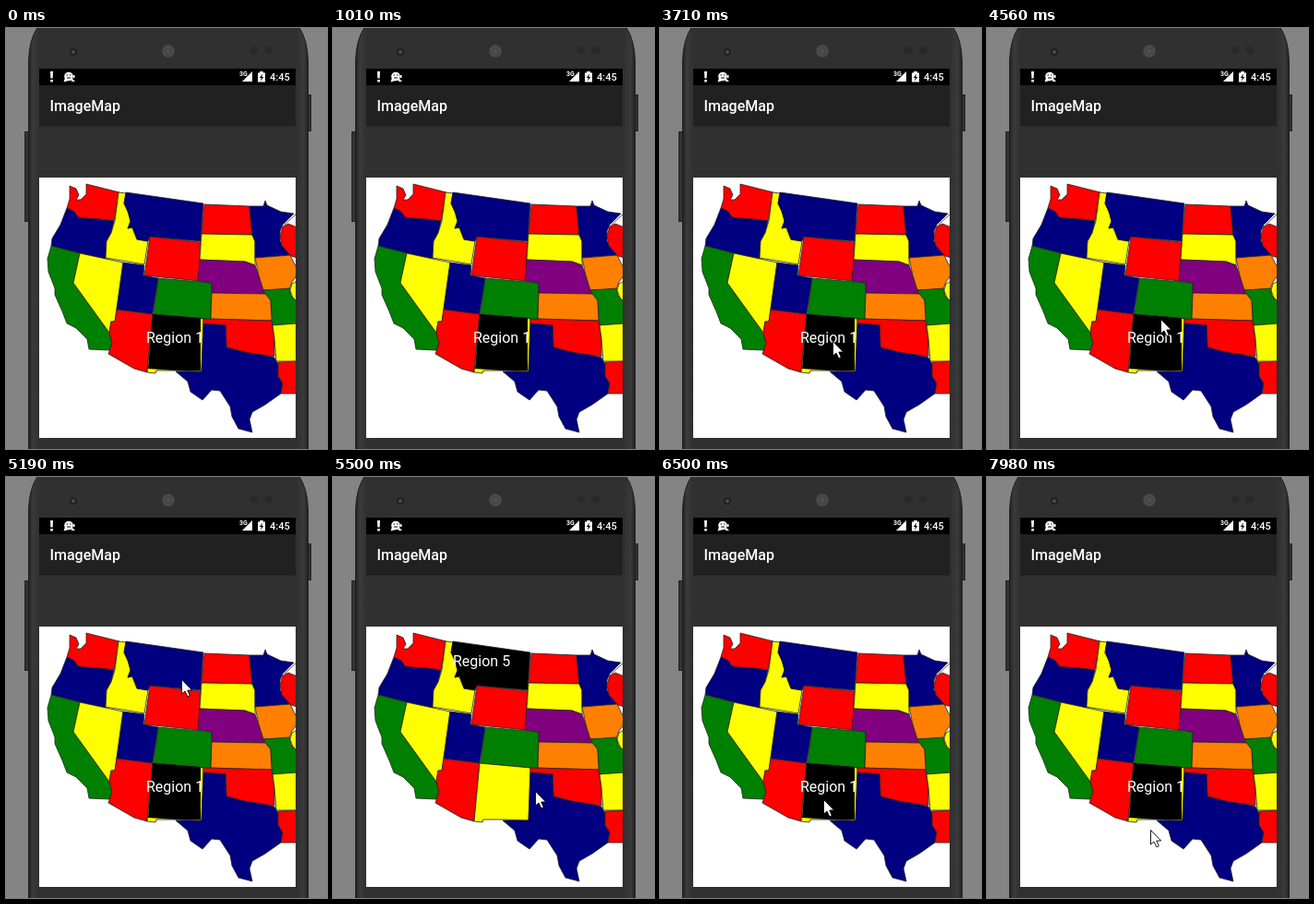
Recreate the animation shown at these times as an HTML page. Size 348 by 456 pixels, loop 8000 ms.

```html
<!DOCTYPE html>
<html lang="en">
<head>
<meta charset="utf-8">
<title>ImageMap</title>
<style>
  html, body { margin: 0; height: 100%; overflow: hidden; background: #848484; }
  svg { display: block; width: 100%; height: 100%; }
  text { font-family: Roboto, sans-serif; fill: #fff; }
  #states { stroke: #222; stroke-width: .8; stroke-linejoin: round; }
  .navy { fill: #000080; }
  .red { fill: #f00; }
  .yellow { fill: #ff0; }
  .green { fill: #008000; }
  .orange { fill: #ff8000; }
  .purple { fill: #800080; }
</style>
</head>
<body>
<svg viewBox="0 0 348 456">
  <defs>
    <linearGradient id="bezel">
      <stop offset="0" stop-color="#222"/>
      <stop offset=".015" stop-color="#3a3a3a"/>
      <stop offset=".04" stop-color="#303030"/>
      <stop offset=".96" stop-color="#303030"/>
      <stop offset=".985" stop-color="#3a3a3a"/>
      <stop offset="1" stop-color="#222"/>
    </linearGradient>
    <clipPath id="screen"><rect x="36" y="162" width="278" height="282"/></clipPath>
  </defs>

  <!-- Phone -->
  <g fill="#333" stroke="#222">
    <rect x="20.5" y="112.5" width="5" height="97"/>
    <rect x="326.5" y="72.5" width="4" height="39"/>
  </g>
  <path d="M24.5 460V36Q25 12 35 -2H317Q327 12 327.5 36V460Z" fill="url(#bezel)" stroke="#1c1c1c"/>
  <circle cx="73" cy="26" r="4" fill="#202020"/>
  <circle cx="73" cy="26" r="2" fill="#4c4c4c"/>
  <circle cx="176" cy="25" r="7" fill="#444"/>
  <circle cx="176" cy="25" r="5" fill="none" stroke="#575757" stroke-width="2" stroke-dasharray="1 1.5"/>
  <circle cx="176" cy="25" r="2.5" fill="#505050"/>
  <circle cx="269" cy="24" r="4.5" fill="#292929"/>
  <circle cx="285" cy="24" r="4.5" fill="#292929"/>

  <!-- Status bar -->
  <rect x="36" y="44" width="278" height="18"/>
  <g fill="#fff">
    <path d="M48 47H51L50.6 54.5H48.4ZM48.2 56H50.8V58.5H48.2Z"/>
    <circle cx="68" cy="52.5" r="4.8"/>
    <path d="M64 54L62.5 58.5L68 57ZM71 54L75 58H71ZM73 51H74.5V54H73Z"/>
    <path d="M256 58H267V47Z"/>
    <path d="M273 48.5H275.2V47H278.8V48.5H281V58.5H273Z"/>
  </g>
  <path d="M65.5 51H67M69 51H70.5M66 54H70" stroke="#000"/>
  <path d="M278 49.5L274.8 54H276.8L276 57.5L279.3 53H277.3Z"/>
  <text x="253" y="52" font-size="7" font-weight="700">3G</text>
  <text x="286" y="57" font-size="11" font-weight="500">4:45</text>

  <!-- App -->
  <rect x="36" y="62" width="278" height="44" fill="#212121"/>
  <rect x="36" y="106" width="278" height="350" fill="#303030"/>
  <path d="M36 106.5H314" stroke="#282828"/>
  <text x="47.5" y="90" font-size="16" font-weight="500">ImageMap</text>
  <rect x="36" y="162" width="278" height="282" fill="#fff"/>

  <g clip-path="url(#screen)">
    <g id="states">
      <polygon class="red" points="69,171 76,174 79,181 76,186 81,186 87,180 87,169 123,178 117,209 100,207 84,206 78,205 74,199 66,195 69,185"/>
      <polygon class="navy" points="66,195 74,199 78,205 84,206 100,207 117,209 114,222 109,231 108,251 80,244 49,236 50,228 59,213"/>
      <polygon class="green" points="49,236 80,244 73,276 112,330 115,341 112,349 90,348 88,337 76,325 66,320 61,307 53,289 53,282 46,264 45,250"/>
      <polygon class="yellow" points="80,244 127,254 118,318 114,318 112,330 73,276"/>
      <polygon class="yellow" points="122,178 130,179 128,190 133,200 135,210 132,217 137,216 142,229 154,231 150,256 108,249 109,231 114,222 118,209"/>
      <polygon class="navy" id="region5" points="130,178 214,190 211,231 156,226 154,231 142,229 137,216 132,217 135,209 132,199 128,190"/>
      <polygon class="red" points="156,226 211,232 209,274 150,268"/>
      <polygon class="navy" points="127,254 150,257 149,268 165,271 159,310 120,305"/>
      <polygon class="red" points="120,305 159,310 153,373 139,369 111,353 115,341 112,330 114,318 118,318"/>
      <polygon class="green" points="165,271 223,276 222,316 160,310"/>
      <polygon class="yellow" points="159,310 214,315 212,372 184,371 163,371 162,374 153,373"/>
      <polygon class="red" points="215,191 264,193 267,224 212,223"/>
      <polygon class="yellow" points="212,223 267,224 270,231 270,257 259,253 210,251"/>
      <polygon class="purple" points="210,251 259,253 270,257 274,268 279,284 281,288 223,287 223,276 208,274"/>
      <polygon class="orange" points="223,287 281,288 287,295 288,317 222,315"/>
      <polygon class="red" points="214,315 288,317 291,336 291,356 277,354 263,352 254,350 239,346 238,322 214,320"/>
      <polygon class="navy" points="214,320 238,322 239,346 254,350 263,352 277,354 291,357 295,364 295,377 300,385 298,396 281,408 267,416 264,424 267,438 252,434 245,421 243,410 232,393 223,392 213,403 200,394 197,383 184,372 212,372"/>
      <polygon class="navy" points="264,193 279,193 281,187 283,192 298,199 312,201 300,213 297,220 297,231 308,246 270,249 270,231 267,224"/>
      <polygon class="red" points="300,215 306,212 316,216 316,249 309,247 299,236 297,225"/>
      <polygon class="orange" points="270,249 308,246 312,254 316,262 314,270 310,275 307,283 279,284 274,268"/>
      <polygon class="yellow" points="316,274 310,277 308,284 311,292 316,297"/>
      <polygon class="green" points="279,284 307,282 309,290 316,298 316,321 289,322 287,295"/>
      <polygon class="yellow" points="289,322 316,320 316,361 293,361 291,336"/>
      <polygon class="red" points="295,362 316,361 316,396 298,396 300,385 295,377"/>
      <path d="M302 213L316 200"/>
    </g>
    <polygon id="region1" points="159,310 211,314 211,371 184,371 154,369"/>
    <text id="label" font-size="16"></text>
  </g>
  <path id="cursor" d="M.5 .5V16L4 13L6.8 18.8L9.3 17.7L6.8 12H11.7Z" fill="#fff" stroke="#000" stroke-width=".9"/>
</svg>

<script>
  const LOOP = 8000, STEP = 76;
  const OFF = null;
  const byId = id => document.getElementById(id);
  const cursor = byId('cursor'), label = byId('label');

  // Each move: start time, then pointer positions one step apart; the last one holds.
  const moves = [
    [0, OFF],
    [80, [201, 351], [225, 260], [262, 140], [300, 32], OFF],
    [930, [280, -16], OFF],
    [2170, [262, -13], [259, -5], [268, 4], [277, 0], [281, -7]],
    [2700, [274, -14], OFF],
    [3010, [273, -8], [267, 415], OFF],
    [3330, [160, 413], [151, 370], [156, 325], [170, 307], [182, 324], [187, 339]],
    [4560, [188, 315], [190, 275], [192, 235], [191, 212], [190, 219]],
    [5260, [190, 219], [208, 257], [195, 307], [219, 340]],
    [5800, [214, 322], [199, 313], [184, 332], [177, 349]],
    [7050, [166, 346], [145, 338], [132, 335]],
    [7430, [132, 334]],
    [7830, [146, 350], [177, 382], [197, 397]]
  ];

  function pointerAt(t) {
    const [start, ...points] = moves.findLast(move => move[0] <= t);
    return points[Math.min(points.length - 1, Math.floor((t - start) / STEP))];
  }

  function select(region) {
    const first = region === 1;
    byId('region1').style.display = first ? '' : 'none';
    byId('region5').style.fill = first ? '' : '#000';
    label.textContent = 'Region ' + region;
    label.setAttribute('x', first ? 152 : 130);
    label.setAttribute('y', first ? 340.5 : 205);
  }

  function draw() {
    const t = performance.now() % LOOP;
    const point = pointerAt(t);
    cursor.style.display = point ? '' : 'none';
    if (point) cursor.setAttribute('transform', `translate(${point})`);
    select(t >= 5260 && t < 6500 ? 5 : 1);
    requestAnimationFrame(draw);
  }
  draw();
</script>
</body>
</html>
```
